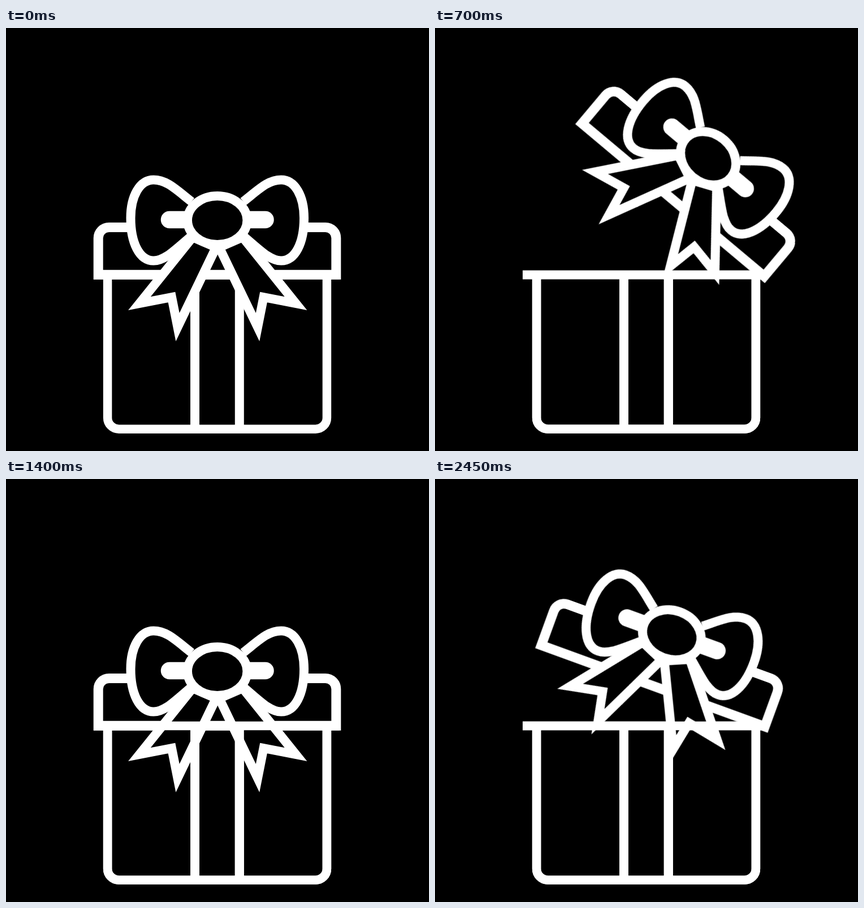
Recreate the animation shown at these times as an HTML page. Size 748 px wide and 748 px high, loop 2800 ms.

```html
<!DOCTYPE html>
<html lang="en">
<head>
<meta charset="utf-8">
<title>Gift box</title>
<style>
  html, body { margin: 0; width: 100%; height: 100%; overflow: hidden; background: #000; }
  svg { display: block; width: 100%; height: 100%; }
  .ink { fill: #000; stroke: #fff; stroke-width: 16; stroke-miterlimit: 10; }
  .box { fill: none; stroke-width: 15.5; }
  .rim { stroke-width: 17; }
  .bar { stroke-width: 30.5; stroke-linecap: round; }
  #lid { transform-origin: 579px 435.5px; }
</style>
</head>
<body>
<svg viewBox="0 0 748 748">
  <defs>
    <g id="box" class="ink box">
      <path d="M155 436.5H589 M179.6 436.5V689.2A20 20 0 0 0 199.6 709.2H547.4A20 20 0 0 0 567.4 689.2V436.5"/>
      <path d="M334 436.5V709 M412.8 436.5V709" stroke-width="16"/>
    </g>
    <g id="wing">
      <path d="M328 307C300 285 284 268.5 261 268.5C236 268.5 220.5 298 220.5 336C220.5 380 236 411.5 261 411.5C281 411.5 298 393 330 366"/>
      <path class="bar" d="M289 339H325"/>
    </g>
    <path id="tail" d="M330 370L236 487L293 476L303.5 529L371.4 388Z"/>
  </defs>

  <use href="#box"/>
  <g id="lid" class="ink">
    <path class="rim" d="M163.2 436.2V371.4A19 19 0 0 1 182.2 352.4H564.8A19 19 0 0 1 583.8 371.4V436.2Z"/>
    <use href="#wing"/>
    <use href="#wing" transform="matrix(-1 0 0 1 747.5 0)"/>
    <use href="#tail"/>
    <use href="#tail" transform="matrix(-1 0 0 1 748.5 0)"/>
    <ellipse cx="373.7" cy="340" rx="52.7" ry="43"/>
  </g>
  <use id="front" href="#box"/>
</svg>
<script>
  const LOOP = 2800;
  // [start in ms, lid angle, box in front of the lid]
  const poses = [
    [0, 0, 0], [350, 20, 1], [700, 40, 1], [1050, 60, 1],
    [1400, 0, 1], [1750, 40, 1], [2450, 20, 1], [LOOP, 20, 1]
  ];

  function play(id, style) {
    const frames = poses.map(([time, angle, front]) =>
      ({ offset: time / LOOP, easing: 'step-end', ...style(angle, front) }));
    const animation = document.getElementById(id)
      .animate(frames, { duration: LOOP, iterations: Infinity });
    animation.startTime = 0;
  }

  play('lid', angle => ({ transform: `rotate(${angle}deg)` }));
  play('front', (angle, front) => ({ opacity: front }));
</script>
</body>
</html>
```
